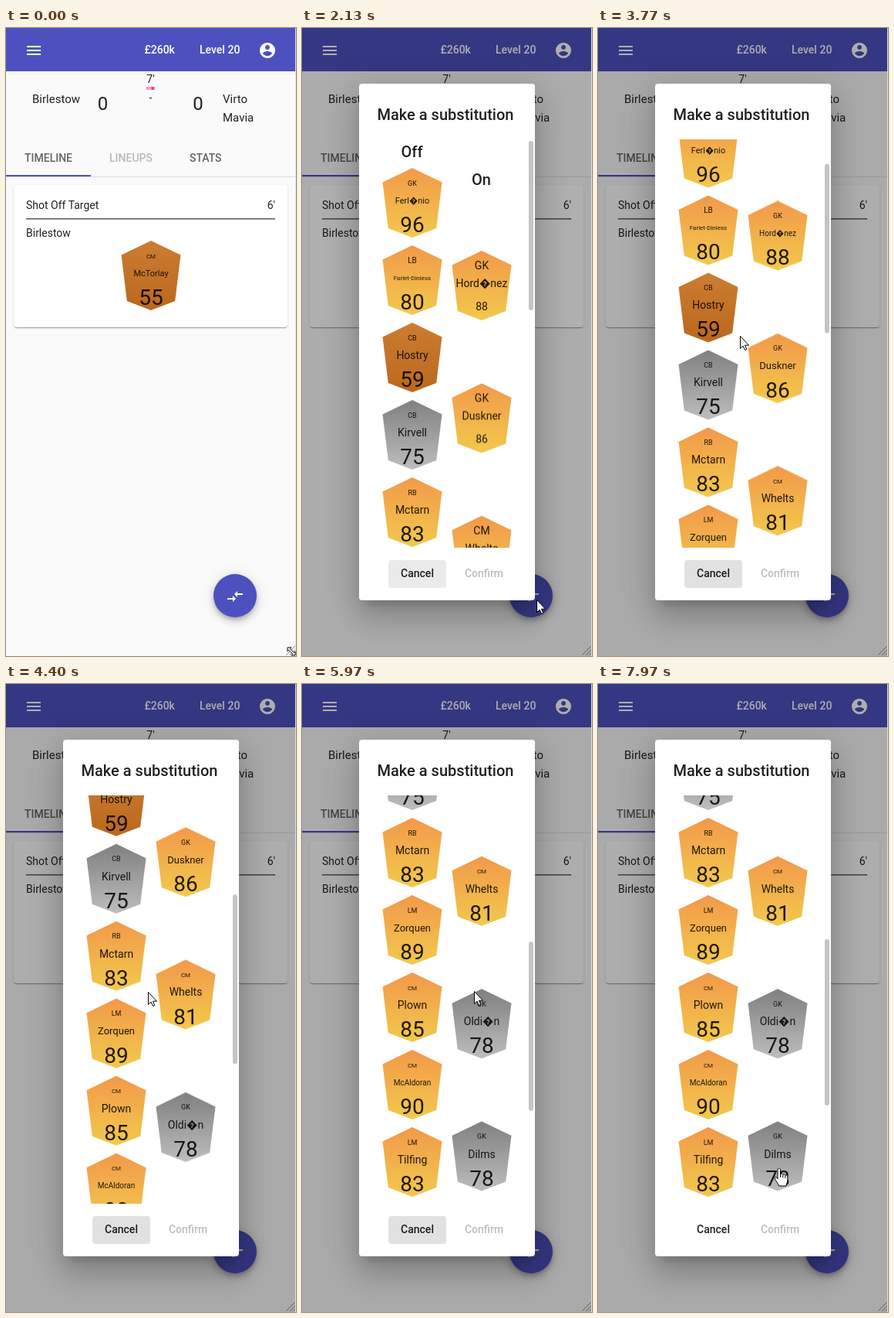
These frames come from a looping animation (376 by 812 pixels, 8000 ms). An HTML page:

```html
<!DOCTYPE html>
<html lang="en">
<head>
<meta charset="utf-8">
<title>Make a substitution</title>
<style>
html, body { margin: 0; width: 100%; height: 100%; overflow: hidden; }
body { position: relative; background: #fafafa; font: 14px Roboto, sans-serif; }
div, svg { position: absolute; }
.full { left: 0; top: 0; width: 376px; height: 812px; }
text { fill: rgba(0,0,0,.87); white-space: pre; }
.mid { text-anchor: middle; }
.end { text-anchor: end; }
.bold { font-weight: 500; }
.white, .white text { fill: #fff; }
.big { font-size: 20px; }
.team { font-size: 15px; }
.score { font-size: 24px; }
.tab { fill: rgba(0,0,0,.6); }
.off { fill: rgba(0,0,0,.26); }

.head { width: 376px; height: 56px; background: #4c51bf; }
.card {
  left: 10px; top: 203px; width: 355px; height: 184px; border-radius: 4px; background: #fff;
  box-shadow: 0 2px 1px -1px rgba(0,0,0,.2), 0 1px 1px rgba(0,0,0,.14), 0 1px 3px rgba(0,0,0,.12);
}
.fab {
  left: 269px; top: 706px; width: 56px; height: 56px; border-radius: 50%; background: #4c51bf; overflow: hidden;
  box-shadow: 0 3px 5px -1px rgba(0,0,0,.2), 0 6px 10px rgba(0,0,0,.14), 0 1px 18px rgba(0,0,0,.12);
}
.ripple {
  left: -10px; top: -12px; width: 92px; height: 92px; border-radius: 50%; background: #fff;
  animation: ripple 8s infinite;
}
.edge { left: 375px; top: 0; width: 1px; height: 812px; background: #e0e0e0; }

.bar { left: 182px; top: 76px; width: 11px; height: 4px; overflow: hidden; background: #ff9dbf; }
.bar div { top: 0; width: 100%; height: 100%; animation: 2s -1.23s infinite; }
.bar .fill { left: 0; background: #ff4081; transform-origin: left; }
.bar .one { left: -145.167%; animation-name: slide1; }
.bar .one .fill { animation-name: grow1; }
.bar .two { left: -54.889%; animation-name: slide2; }
.bar .two .fill { animation-name: grow2; }

.backdrop { background: #000; opacity: 0; animation: dim 8s infinite; }
.dialog { opacity: 0; transform-origin: 188px 406px; animation: open 8s infinite; }
.panel {
  left: 74px; top: 72px; width: 228px; height: 668px; border-radius: 4px; background: #fff;
  box-shadow: 0 11px 15px -7px rgba(0,0,0,.2), 0 24px 38px 3px rgba(0,0,0,.14), 0 9px 46px 8px rgba(0,0,0,.12);
}
.focus { opacity: 0; animation: focus 8s infinite; }
.thumb {
  left: 294px; top: 146px; width: 6px; height: 219px; border-radius: 3px; background: #c4c4c4;
  animation: thumb 8s linear infinite;
}
#list { animation: scroll 8s linear infinite; }
.raw { animation: raw 8s step-end infinite; }
.fit { animation: fit 8s step-end infinite; }

.cursor { overflow: visible; left: 0; top: 0; width: 1px; height: 1px; animation: move 8s ease-in-out infinite; }
.cursor path { fill: #fff; stroke: #000; stroke-linejoin: round; }
.size { animation: size 8s step-end infinite; }
.arrow { animation: arrow 8s step-end infinite; }
.hand { animation: hand 8s step-end infinite; }

@keyframes slide1 {
  0% { transform: none; }
  20% { transform: none; animation-timing-function: cubic-bezier(.5,0,.702,.496); }
  59.15% { transform: translateX(83.671%); animation-timing-function: cubic-bezier(.302,.381,.55,.956); }
  100% { transform: translateX(200.611%); }
}
@keyframes grow1 {
  0% { transform: scaleX(.08); }
  36.65% { transform: scaleX(.08); animation-timing-function: cubic-bezier(.335,.125,.786,1); }
  69.15% { transform: scaleX(.661); animation-timing-function: cubic-bezier(.06,.11,.6,1); }
  100% { transform: scaleX(.08); }
}
@keyframes slide2 {
  0% { transform: none; animation-timing-function: cubic-bezier(.15,0,.515,.41); }
  25% { transform: translateX(37.652%); animation-timing-function: cubic-bezier(.31,.284,.8,.734); }
  48.35% { transform: translateX(84.386%); animation-timing-function: cubic-bezier(.4,.627,.6,.902); }
  100% { transform: translateX(160.278%); }
}
@keyframes grow2 {
  0% { transform: scaleX(.08); animation-timing-function: cubic-bezier(.205,.057,.577,.454); }
  19.15% { transform: scaleX(.457); animation-timing-function: cubic-bezier(.152,.196,.648,1); }
  44.15% { transform: scaleX(.728); animation-timing-function: cubic-bezier(.258,0,.212,1.38); }
  100% { transform: scaleX(.08); }
}
@keyframes ripple {
  0%, 18% { transform: scale(0); opacity: .1; animation-timing-function: cubic-bezier(0,0,.2,1); }
  22.5%, 23.5% { transform: none; opacity: .1; }
  26.5%, 100% { transform: none; opacity: 0; }
}
@keyframes dim {
  0%, 23.125% { opacity: 0; animation-timing-function: cubic-bezier(.25,.8,.25,1); }
  28.125%, 100% { opacity: .32; }
}
@keyframes open {
  0%, 23.5% { opacity: 0; transform: scale(.7); animation-timing-function: cubic-bezier(0,0,.2,1); }
  25.4%, 100% { opacity: 1; transform: none; }
}
@keyframes focus {
  0%, 25.5% { opacity: 0; animation-timing-function: cubic-bezier(.35,0,.25,1); }
  28%, 82.9% { opacity: .12; animation-timing-function: cubic-bezier(.35,0,.25,1); }
  85.4%, 100% { opacity: 0; }
}
@keyframes scroll {
  0%, 45% { transform: none; }
  51.625%, 52.5% { transform: translateY(-200px); }
  55% { transform: translateY(-274px); }
  58.75% { transform: translateY(-360px); animation-timing-function: ease-out; }
  62.5%, 100% { transform: translateY(-408px); }
}
@keyframes thumb {
  0%, 45% { transform: none; }
  51.625%, 52.5% { transform: translateY(92px); }
  55% { transform: translateY(126px); }
  58.75% { transform: translateY(165px); animation-timing-function: ease-out; }
  62.5% { transform: translateY(187px); height: 219px; }
  82.875% { transform: translateY(187px); height: 219px; animation-timing-function: step-end; }
  83.25% { transform: translateY(172px); height: 203px; animation-timing-function: step-end; }
  86.25%, 100% { transform: translateY(184px); height: 215px; }
}
@keyframes raw { 0% { opacity: 1; } 27.5%, 100% { opacity: 0; } }
@keyframes fit { 0% { opacity: 0; } 27.5%, 100% { opacity: 1; } }
@keyframes move {
  0%, 1.25% { transform: translate(370px,806px); }
  10.375% { transform: translate(309px,746px); }
  16.25% { transform: translate(304px,738px); }
  20% { transform: translate(305px,740px); }
  26.625%, 27.5% { transform: translate(304px,739px); }
  31.25%, 31.625% { transform: translate(312px,508px); animation-timing-function: linear; }
  35% { transform: translate(240px,330px); animation-timing-function: linear; }
  37.5% { transform: translate(160px,217px); animation-timing-function: ease-out; }
  41.625%, 42.5% { transform: translate(140px,359px); }
  45%, 62.875% { transform: translate(184px,398px); }
  66.875% { transform: translate(198px,290px); }
  72.5% { transform: translate(219px,396px); }
  74.625% { transform: translate(223px,397px); }
  79.625%, 82.875% { transform: translate(236px,461px); }
  90%, 92.875% { transform: translate(222px,405px); }
  97.125%, 99.125% { transform: translate(233px,629px); }
  99.625%, 100% { transform: translate(235px,626px); }
}
@keyframes size { 0% { opacity: 1; } 1.875%, 100% { opacity: 0; } }
@keyframes arrow {
  0%, 7.75%, 34.125%, 36.875%, 75%, 95.875%, 100% { opacity: 0; }
  1.875%, 23.75%, 35.875%, 44.75%, 94.375% { opacity: 1; }
}
@keyframes hand {
  0%, 23.75%, 35.875%, 44.75%, 94.375% { opacity: 0; }
  7.75%, 34.125%, 36.875%, 75%, 95.875%, 100% { opacity: 1; }
}
</style>
</head>
<body>
<div class="head"></div>
<div class="card"></div>
<div class="fab"><div class="ripple"></div></div>
<div class="bar">
  <div class="one"><div class="fill"></div></div>
  <div class="two"><div class="fill"></div></div>
</div>

<svg class="full" viewBox="0 0 376 812">
  <defs>
    <linearGradient id="gold" x2="0" y2="1"><stop stop-color="#f2994a"/><stop offset="1" stop-color="#f2c94c"/></linearGradient>
    <linearGradient id="silver" x2="0" y2="1"><stop stop-color="#808080"/><stop offset="1" stop-color="#bdbdbd"/></linearGradient>
    <linearGradient id="bronze" x2="0" y2="1"><stop stop-color="#cb7d31"/><stop offset="1" stop-color="#bb681e"/></linearGradient>
    <clipPath id="view"><rect x="74" y="144" width="228" height="528"/></clipPath>
  </defs>
  <g class="white">
    <path d="M27 23h18v2H27zM27 28h18v2H27zM27 33h18v2H27z"/>
    <text class="bold" x="179.5" y="33">£260k</text>
    <text class="bold" x="251" y="33">Level 20</text>
    <path transform="translate(327 17)" d="M12 2C6.48 2 2 6.48 2 12s4.48 10 10 10 10-4.48 10-10S17.52 2 12 2zm0 3c1.66 0 3 1.34 3 3s-1.34 3-3 3-3-1.34-3-3 1.34-3 3-3zm0 14.2c-2.5 0-4.71-1.28-6-3.22.03-1.99 4-3.08 6-3.08 1.99 0 5.97 1.09 6 3.08-1.29 1.94-3.5 3.22-6 3.22z"/>
    <path transform="translate(285 723)" d="M9 14H2v2h7v3l4-4-4-4v3zm6-1v-3h7V8h-7V5l-4 4 4 4z"/>
  </g>
  <text class="team" x="34" y="97">Birlestow</text>
  <text class="score mid" x="125.5" y="105.5">0</text>
  <text class="mid" x="187.5" y="71">7'</text>
  <text class="mid" x="187.5" y="95">-</text>
  <text class="score mid" x="249" y="105.5">0</text>
  <text class="team" x="281" y="97">Virto</text>
  <text class="team" x="281" y="121">Mavia</text>

  <path fill="#dcdcdc" d="M0 192h375v1H0z"/>
  <path fill="#4c51bf" d="M0 190h110v2H0z"/>
  <text class="tab bold" x="24" y="173">TIMELINE</text>
  <text class="off bold" x="134" y="173">LINEUPS</text>
  <text class="tab bold" x="238" y="173">STATS</text>

  <text x="26" y="234">Shot Off Target</text>
  <text class="end" x="349" y="234">6'</text>
  <path fill="#5a5a5a" d="M26 246h323v1.5H26z"/>
  <text x="26" y="270">Birlestow</text>
  <g id="event"></g>
  <path stroke="#888" d="M363 811l12-12M368 811l7-7M372 811l3-3"/>
</svg>

<div class="full backdrop"></div>
<div class="full dialog">
  <div class="panel"></div>
  <svg class="full" viewBox="0 0 376 812">
    <text class="big bold mid" x="186" y="119">Make a substitution</text>
    <g clip-path="url(#view)">
      <g id="list">
        <text class="big bold mid" x="142.5" y="167">Off</text>
        <text class="big bold mid" x="232.5" y="203">On</text>
      </g>
    </g>
    <rect class="focus" x="112" y="688" width="75" height="36" rx="4"/>
    <text class="bold mid" x="149.5" y="710">Cancel</text>
    <text class="off bold mid" x="236" y="710">Confirm</text>
  </svg>
  <div class="thumb"></div>
</div>
<div class="edge"></div>

<svg class="cursor">
  <path class="size" d="M-5-5H0L-1.7-3.3 3.3 1.7 5 0V5H0L1.7 3.3-3.3-1.7-5 0Z"/>
  <path class="arrow" d="M.5.5V16.5L4.1 13.2 6.6 18.5 8.8 17.5 6.5 12.2H11.5Z"/>
  <path class="hand" d="M-2 14V1.8C-2-.2 1.5-.2 1.5 1.8V8C2 6.9 4.6 7 4.8 8.6 5.4 7.6 7.7 8 7.8 9.4 8.6 8.6 10.8 9 10.8 11V16C10.8 19 9 20 9 23H-.5C-1 20-5.5 15.5-6 13-6.2 11-3.5 11-2 14ZM1.5 8V12M4.8 9V12.5M7.8 9.6V13"/>
</svg>

<script>
const posSize = { GK: 9, LB: 10, CB: 9, RB: 9, LM: 9, CM: 8 };

function add(parent, tag, attrs, label) {
  const el = document.createElementNS('http://www.w3.org/2000/svg', tag);
  for (const key in attrs) el.setAttribute(key, attrs[key]);
  if (label) el.textContent = label;
  return parent.appendChild(el);
}

// Three centred lines: [label, font size, baseline]
function lines(parent, cls, rows) {
  const g = add(parent, 'g', { class: cls });
  for (const [label, size, y] of rows)
    add(g, 'text', { class: 'mid', y, style: `font-size:${size}px` }, label);
}

function badge(parent, x, y, [metal, pos, name, size, rating], late) {
  const g = add(parent, 'g', { transform: `translate(${x} ${y})` });
  add(g, 'path', { d: 'M0 0L38.5 18.5 31.2 78 0 90-31.2 78-38.5 18.5Z', fill: `url(#${metal})` });
  if (late) lines(g, 'raw', [[pos, 14, 24], [name, 14, 47], [rating, 14, 77]]);
  lines(g, late ? 'fit' : '', [[pos, posSize[pos], 22.5], [name, size, 42 + size * .355], [rating, 28, 83]]);
}

const starters = [
  ['gold', 'GK', 'Ferl\uFFFDnio', 11, 96],
  ['gold', 'LB', 'Farlet-Dinless', 8, 80],
  ['bronze', 'CB', 'Hostry', 14, 59],
  ['silver', 'CB', 'Kirvell', 14, 75],
  ['gold', 'RB', 'Mctarn', 14, 83],
  ['gold', 'LM', 'Zorquen', 13, 89],
  ['gold', 'CM', 'Plown', 14, 85],
  ['gold', 'CM', 'McAldoran', 10, 90],
  ['gold', 'LM', 'Tilfing', 14, 83]
];
const bench = [
  ['gold', 'GK', 'Hord\uFFFDnez', 10, 88],
  ['gold', 'GK', 'Duskner', 13, 86],
  ['gold', 'CM', 'Whelts', 14, 81],
  ['silver', 'GK', 'Oldi\uFFFDn', 14, 78],
  ['silver', 'GK', 'Dilms', 14, 78]
];
const list = document.getElementById('list');
starters.forEach((p, i) => badge(list, 143, 181 + 100 * i, p));
bench.forEach((p, i) => badge(list, 233, 288 + 171.4 * i, p, true));
badge(document.getElementById('event'), 188, 275, ['bronze', 'CM', 'McTorlay', 11, 55]);
</script>
</body>
</html>
```
